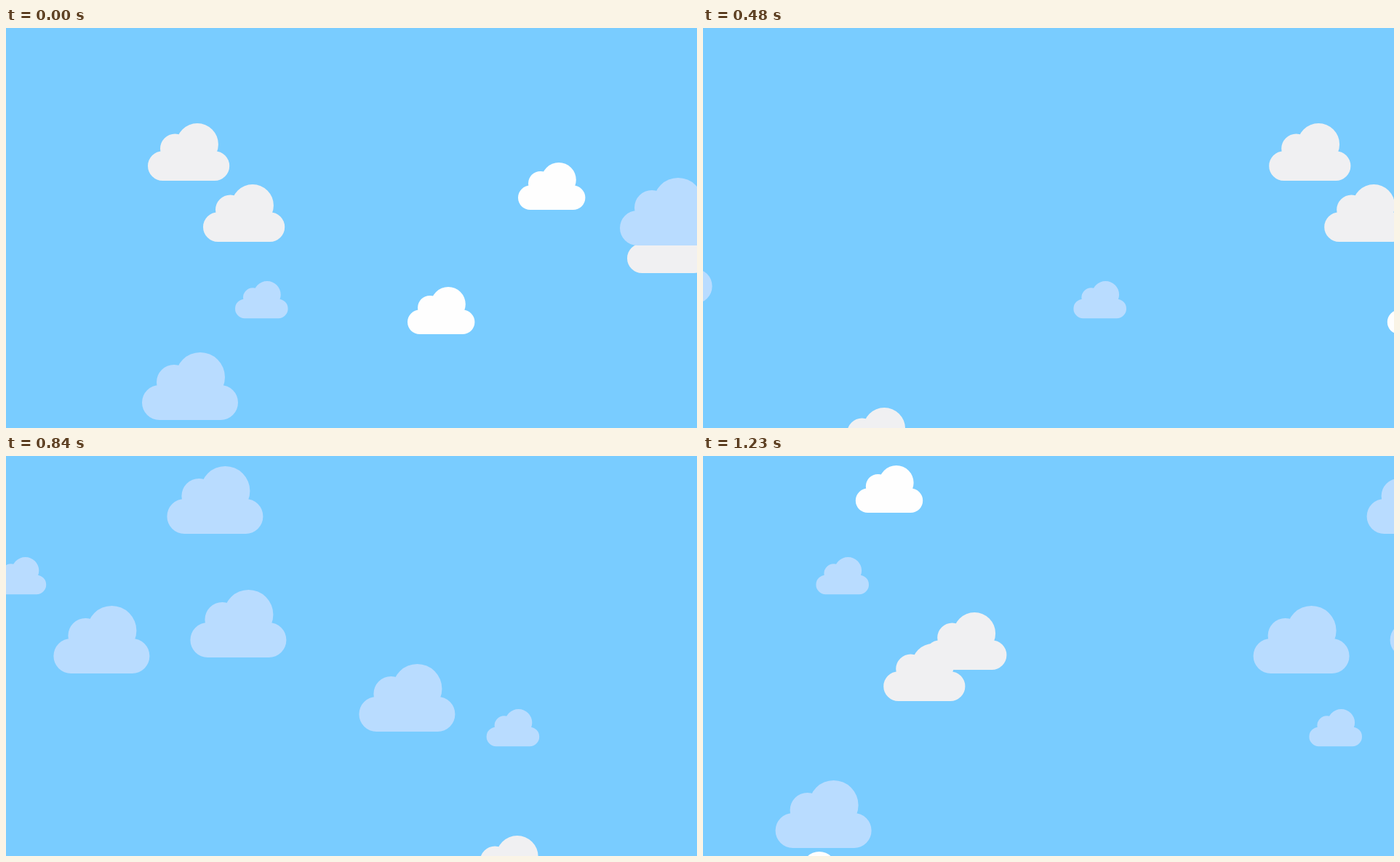
Write an HTML page with a canvas that moves like this. It is 950x550 px and loops after 1.26 s.

```html
<!DOCTYPE html>
<html lang="en">
<head>
<meta charset="utf-8">
<title>Drifting clouds</title>
<style>
  html, body { margin: 0; height: 100%; overflow: hidden; background: #79ccff; }
  canvas { display: block; }
</style>
</head>
<body>
<canvas width="950" height="550"></canvas>
<script>
const ctx = document.querySelector('canvas').getContext('2d');
const LOOP = 1260, STEP = 30;
const TRACK = 2161, MARGIN = 200; // clouds circle a track wider than the stage
const BLUE = '#b9dcff', WHITE = '#fefefe', GREY = '#f0f0f2';

// Back to front; every nearer layer is larger and faster. Spots are [left, top] at time zero.
const layers = [
  { color: BLUE, spots: [[315, 348], [1798, 139]] },
  { color: WHITE, spots: [[704, 185], [552, 356], [1334, 13], [1228, 544], [1030, -11]] },
  { color: GREY, spots: [[195, 131], [271, 215], [854, 258], [1759, 522], [911, 215]] },
  { color: BLUE, spots: [[844, 206], [187, 446], [1264, 286], [1000, 14], [1032, 184]] }
];

const cloud = new Path2D();
cloud.roundRect(0, 45, 132, 48, 24);
for (const [x, y, r] of [[44, 41, 24], [80, 34, 34]]) {
  cloud.moveTo(x + r, y);
  cloud.arc(x, y, r, 0, 2 * Math.PI);
}

// The drift advances in whole 60 Hz ticks, with a slow start.
function ticksAt(time) {
  const step = Math.floor(time / STEP);
  return step && Math.max(1, Math.floor(1.8 * step - 1.5));
}

function draw(time) {
  const ticks = ticksAt(time);
  ctx.filter = 'none';
  ctx.fillStyle = '#79ccff';
  ctx.fillRect(0, 0, 950, 550);
  ctx.filter = 'blur(0.6px)';
  layers.forEach(({ color, spots }, depth) => {
    const scale = 0.55 + 0.15 * depth;
    const drift = 7.2 * (depth + 1) * ticks;
    ctx.fillStyle = color;
    for (const [left, top] of spots) {
      const x = (left + drift + MARGIN) % TRACK - MARGIN;
      ctx.setTransform(scale, 0, 0, scale, x, top);
      ctx.fill(cloud);
    }
  });
  ctx.resetTransform();
}

const start = performance.now();
function frame() {
  draw((performance.now() - start) % LOOP);
  requestAnimationFrame(frame);
}
frame();
</script>
</body>
</html>
```
